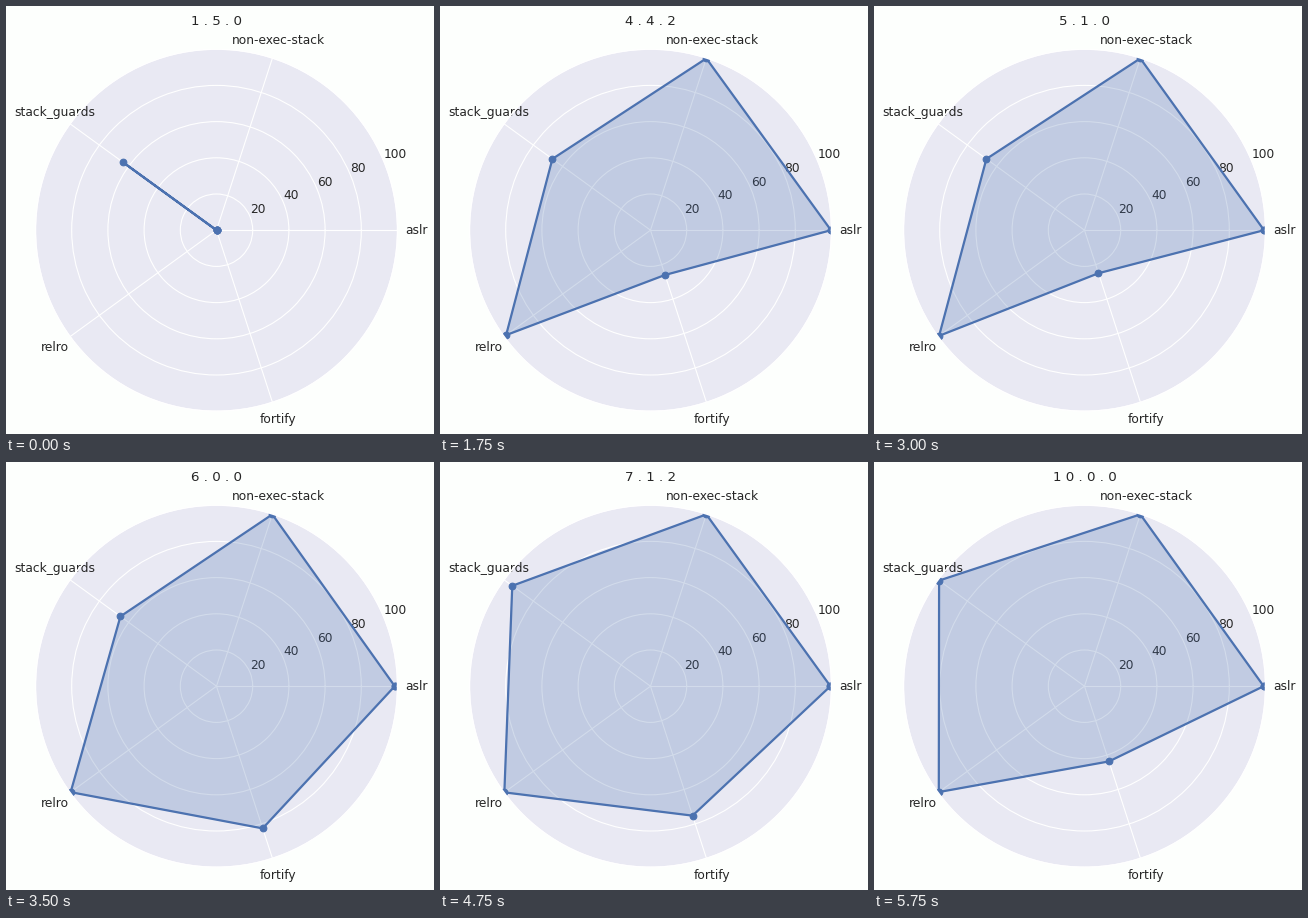
Write a matplotlib script that moves like this. It is 428x428 px and loops after 6 s.

```python
import numpy as np
import matplotlib.pyplot as plt
from matplotlib.animation import FuncAnimation

SIZE, DPI = 428, 80
CX, CY, R = 210.5, 224.2, 181.0
BLUE, INK, PANEL, PAPER = "#4c72b0", "#262626", "#e9e9f3", "#fdfffd"

LABELS = ["aslr", "non-exec-stack", "stack_guards", "relro", "fortify"]

# Percentage of hardened binaries per release, in the order of LABELS
RELEASES = {
    "1.5.0": (0, 0, 63.7, 0, 0),
    "2.3.6": (0, 93.5, 71.7, 0, 0),
    "4.0.4": (0, 97, 79, 0, 0),
    "4.1.2": (95, 99.2, 82, 89.5, 0),
    "4.2.2": (98.9, 99.7, 75, 99.3, 19),
    "4.3.0": (99.3, 99.7, 70, 98.9, 22),
    "4.4.0": (99.7, 99.8, 67.5, 99.2, 25.5),
    "4.4.2": (99.7, 99.8, 67, 98.6, 26),
    "4.4.3": (99.5, 99.8, 67, 98.7, 26),
    "4.4.4": (99.5, 99.8, 67.2, 99.4, 26),
    "5.0.0": (98.5, 99.8, 67.7, 99.3, 25),
    "5.0.2": (98.7, 99.8, 67.5, 99.4, 25),
    "5.1.0": (99.2, 99.8, 67, 99.3, 25),
    "5.1.1": (98.5, 99.8, 66.5, 99.4, 25.5),
    "6.0.0": (98.5, 99.8, 65.6, 99.6, 82.6),
    "6.0.1": (99.2, 99.8, 66, 99.6, 83.7),
    "7.0.0": (99, 99.8, 93.5, 99.8, 75.5),
    "7.1.0": (98.8, 99.8, 94, 99.7, 75.6),
    "7.1.1": (99.1, 99.8, 94.2, 99.8, 75.4),
    "7.1.2": (99.4, 99.8, 94.4, 99.8, 75.2),
    "8.0.0": (99.8, 99.8, 97, 99.7, 71),
    "8.1.0": (99.8, 99.8, 98, 99.7, 62),
    "9.0.0": (99.7, 99.8, 98.8, 99.6, 53),
    "10.0.0": (99, 99.8, 99.3, 99.5, 43.7),
}
VERSIONS = list(RELEASES)

plt.rcParams["font.family"] = "DejaVu Sans"
fig = plt.figure(figsize=(SIZE / DPI, SIZE / DPI), dpi=DPI, facecolor=PAPER)
box = [(CX - R) / SIZE, 1 - (CY + R) / SIZE, 2 * R / SIZE, 2 * R / SIZE]
ax = fig.add_axes(box, projection="polar", facecolor=PANEL)

angles = np.linspace(0, 2 * np.pi, len(LABELS), endpoint=False)
loop = np.append(angles, angles[0])

ax.set_ylim(0, 100)
ax.set_xticks(angles, LABELS)
ax.set_yticks(range(20, 101, 20))
ax.set_rlabel_position(22.5)
ax.set_axisbelow(True)
ax.grid(True, color="white", linewidth=1, linestyle="-")
ax.tick_params(labelsize=11, labelcolor=INK, length=0)
ax.tick_params(axis="x", pad=9.65)
ax.spines["polar"].set(color="white", linewidth=1.25)

line, = ax.plot(loop, np.zeros(len(loop)), "o-", color=BLUE, linewidth=2, markersize=6)
area, = ax.fill(loop, np.zeros(len(loop)), color=BLUE, alpha=0.25)
ax.set_ylim(0, 100)
title = fig.text(CX / SIZE, 1 - 19 / SIZE, "", size=12, color=INK,
                 ha="center", va="baseline")


def draw(i):
    version = VERSIONS[i]
    values = RELEASES[version]
    values = np.append(values, values[0])
    line.set_data(loop, values)
    area.set_xy(np.column_stack([loop, values]))
    title.set_text(" ".join(version))
    return line, area, title


anim = FuncAnimation(fig, draw, frames=len(VERSIONS), init_func=lambda: draw(0),
                     interval=250, repeat=True, repeat_delay=0)
plt.show()
```
